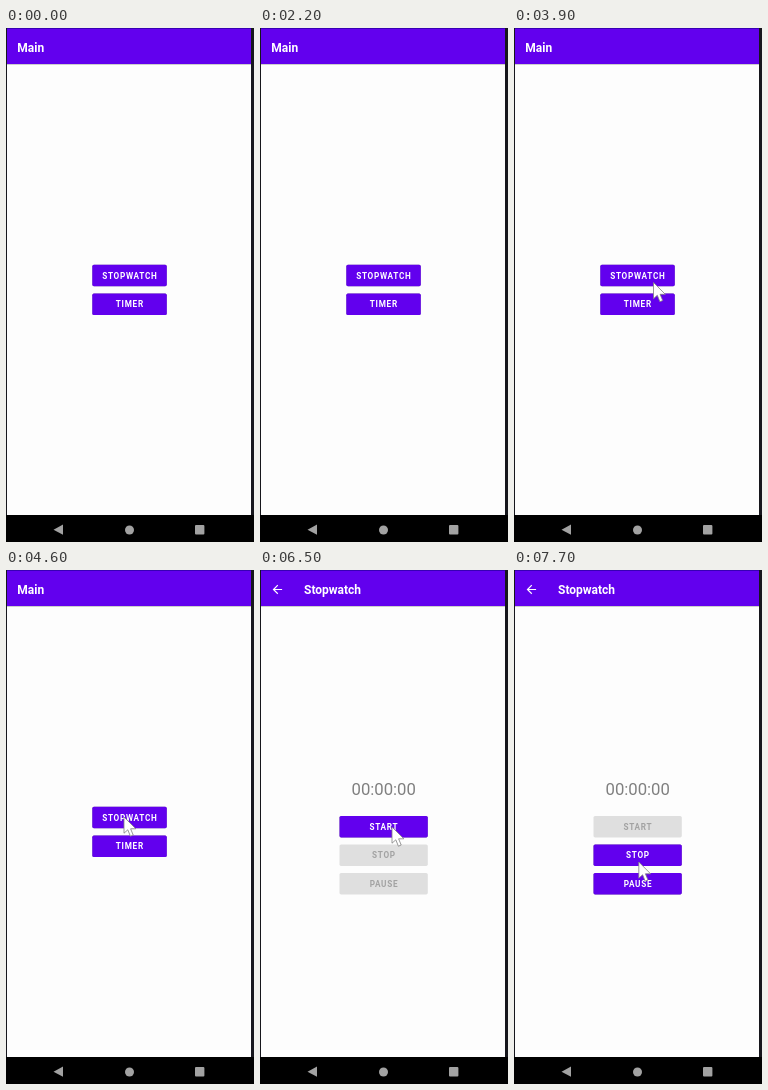
These frames come from a looping animation (248x514 px, 8 s). An HTML page:

```html
<!DOCTYPE html>
<html lang="en">
<head>
<meta charset="utf-8">
<title>Stopwatch app</title>
<style>
  html, body { margin: 0; width: 100%; height: 100%; overflow: hidden; background: #16161c; }
  svg { display: block; width: 248px; height: 514px; font-family: Roboto, sans-serif; }
  .bar { fill: #6200ee; }
  .page { fill: #fdfdfd; }
  .title { font-size: 12px; font-weight: 700; fill: #fff; }
  .label { font-size: 8.2px; font-weight: 700; letter-spacing: .7px; text-anchor: middle; }
  .clock { font-size: 16.7px; text-anchor: middle; fill: #808080; }
  .on rect { fill: #6200ee; filter: drop-shadow(0 .8px .7px rgba(0, 0, 0, .4)); }
  .on text { fill: #fff; }
  .off rect { fill: #dfdfdf; }
  .off text { fill: #a2a2a2; }
</style>
</head>
<body>
<svg viewBox="0 0 248 514">
  <rect width="248" height="514" fill="#16161c"/>
  <rect class="page" x="1" y="36" width="244" height="451"/>
  <rect x="1" y="36" width="244" height="1" fill="#cdcdcd"/>
  <rect class="bar" x="1" y="1" width="244" height="35"/>
  <rect x="1" width="244" height="1" fill="#3700b3"/>
  <rect y="487" width="248" height="27" fill="#000"/>
  <g fill="#a2a2a2">
    <path d="M47.5 501.7L57 496.6V506.8Z"/>
    <circle cx="123.5" cy="502" r="4.5"/>
    <rect x="189" y="497" width="9.4" height="9.4" rx="1"/>
  </g>

  <g id="main">
    <text class="title" x="11.3" y="24">Main</text>
  </g>

  <g id="watch">
    <rect class="page" x="1" y="37" width="244" height="450"/>
    <rect class="bar" x="1" y="1" width="244" height="35"/>
    <path transform="translate(10.3 12.4) scale(.59)" fill="#fff"
      d="M20 11H7.83l5.59-5.59L12 4l-8 8 8 8 1.41-1.41L7.83 13H20z"/>
    <text class="title" x="44" y="24">Stopwatch</text>
    <text class="clock" x="123.7" y="225">00:00:00</text>
  </g>

  <path id="cursor" d="M0 0V16.2L3.8 12.8L6.4 19.2L9.2 18L6.6 11.8H11.8Z"
    fill="#fff" stroke="#808080" stroke-width=".8" stroke-linejoin="round"/>
</svg>
<script>
const LOOP = 8000, TICK = 100;
const $ = id => document.getElementById(id);
const main = $('main'), watch = $('watch'), cursor = $('cursor');

function add(parent, tag, attrs, text = '') {
  const el = document.createElementNS('http://www.w3.org/2000/svg', tag);
  for (const key in attrs) el.setAttribute(key, attrs[key]);
  el.textContent = text;
  return parent.appendChild(el);
}

function button(parent, label, x, y, width, state) {
  const g = add(parent, 'g', { class: state });
  add(g, 'rect', { x, y, width, height: 21.4, rx: 1.6 });
  add(g, 'text', { class: 'label', x: x + width / 2 + .3, y: y + 13.8 }, label);
  return g;
}

button(main, 'STOPWATCH', 86.3, 236.8, 74.5, 'on');
button(main, 'TIMER', 86.3, 265.6, 74.5, 'on');

// Each control has an idle and a running look that cross-fade
const controls = ['START', 'STOP', 'PAUSE'].map((label, i) => {
  const looks = i ? ['off', 'on'] : ['on', 'off'];
  return looks.map(look => button(watch, label, 79.5, 246 + i * 28.5, 88.3, look));
});

// time, x, y of the pointer tip
const path = [
  [3200, 250, 346], [3400, 190, 296], [3600, 150, 264], [3900, 139.5, 254.5],
  [4300, 118, 247], [5000, 118, 247], [5500, 131, 249.5], [5800, 131, 249.5],
  [6200, 132, 254], [6400, 132, 255], [6500, 132, 257], [6700, 127.5, 274],
  [7300, 127.5, 274], [7600, 124.8, 292], [8000, 124.8, 292]
];

const ramp = (t, from, to) => Math.min(1, Math.max(0, (t - from) / (to - from)));

function pointAt(t) {
  const i = path.findIndex(p => p[0] > t);
  if (i < 1) return path[0].slice(1);
  const [t0, x0, y0] = path[i - 1], [t1, x1, y1] = path[i];
  const k = ramp(t, t0, t1);
  return [x0 + (x1 - x0) * k, y0 + (y1 - y0) * k];
}

function draw(now) {
  const t = Math.floor(now % LOOP / TICK) * TICK;
  watch.setAttribute('opacity', ramp(t, 5100, 5300));
  const running = ramp(t, 6900, 7100);
  for (const [idle, active] of controls) {
    idle.setAttribute('opacity', running < 1 ? 1 : 0);
    active.setAttribute('opacity', running);
  }
  cursor.setAttribute('transform', `translate(${pointAt(t)})`);
  cursor.setAttribute('visibility', t > path[0][0] ? 'visible' : 'hidden');
}

const start = performance.now();
function frame() {
  draw(performance.now() - start);
  requestAnimationFrame(frame);
}
frame();
</script>
</body>
</html>
```
